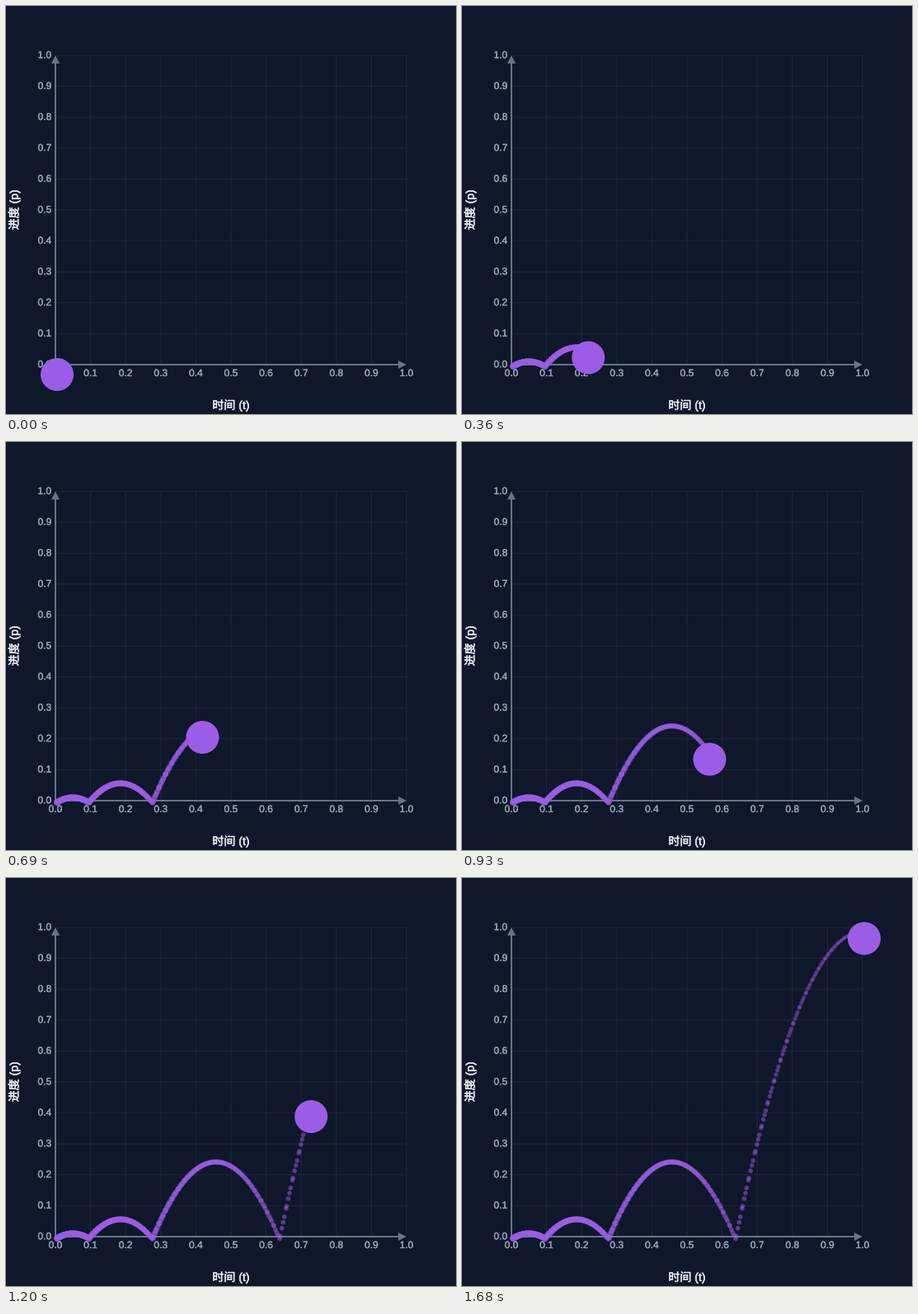
Recreate the animation shown at these times as a matplotlib script. Size 546x496 px, loop 1.71 s.

```python
import matplotlib.pyplot as plt
import numpy as np
from matplotlib.animation import FuncAnimation
from matplotlib.colors import to_rgba
from matplotlib.patches import Circle, Polygon
from matplotlib.patheffects import withStroke

W, H, DPI = 546, 496, 100
PX = 72 / DPI  # points per pixel
LEFT, RIGHT, TOP, BASE = 60, 486, 60, 436
FRAMES, STEP = 57, 30
DELAY, DURATION = 7, 1649

BG, GRID, AXIS = "#0f172a", "#1e293b", "#64748b"
TICK, LABEL, PURPLE = "#94a3b8", "#e2e8f0", "#9b5de5"

plt.rcParams["font.family"] = ["Liberation Sans", "Noto Sans CJK JP"]


def bounce_out(u):
    for shift, floor in ((0, 0), (1.5, 0.75), (2.25, 0.9375), (2.625, 0.984375)):
        arc = 7.5625 * (u - shift / 2.75) ** 2 + floor
        if arc <= 1:
            return arc
    return 1.0


def bounce_in(t):
    return 1 - bounce_out(1 - t)


def center(t, left, bottom, r):
    """Centre of a disc placed by its left and bottom edges."""
    return left + 426 * t + r, bottom - 374.5 * bounce_in(t) - r


fig = plt.figure(figsize=(W / DPI, H / DPI), dpi=DPI, facecolor=BG)
ax = fig.add_axes([0, 0, 1, 1])
ax.set_xlim(0, W)
ax.set_ylim(H, 0)
ax.axis("off")


def line(xs, ys, color, width):
    ax.plot(xs, ys, color=color, lw=width * PX, solid_capstyle="butt",
            snap=False, zorder=1)


def text(x, y, s, size, color, weight, **kw):
    stroke = withStroke(linewidth=weight * PX, foreground=color)
    ax.text(x, y, s, fontsize=size * PX, color=color, zorder=2,
            path_effects=[stroke], **kw)


def tick(x, y, value, ha):
    text(x, y, f"{value:.1f}", 12, TICK, 0.35, ha=ha, va="baseline")


for i in range(11):
    gx = LEFT + (RIGHT - LEFT) * i / 10
    gy = BASE - (BASE - TOP) * i / 10
    line([gx, gx], [TOP, BASE], GRID, 1)
    line([LEFT, RIGHT], [gy, gy], GRID, 1)
    tick(gx, 450, i / 10, "center")
    tick(55.3, gy + 3.3, i / 10, "right")

line([LEFT, LEFT], [TOP + 5, BASE], AXIS, 2)
line([LEFT, RIGHT - 5], [BASE, BASE], AXIS, 2)
for tip in (
    [(LEFT, TOP), (LEFT - 5, TOP + 10), (LEFT + 5, TOP + 10)],
    [(RIGHT, BASE), (RIGHT - 10, BASE - 5), (RIGHT - 10, BASE + 5)],
):
    ax.add_patch(Polygon(tip, color=AXIS, lw=0, zorder=2))

text(273, 490, "时间 (t)", 14, LABEL, 0.5, ha="center", va="baseline")
text(10, 247.7, "进度 (p)", 14, LABEL, 0.5, ha="center", va="center", rotation=90)

# Trail dots come in uneven bursts of five, shrinking and fading with time
bursts = np.arange(56)[:, None] + np.array([0, 0.08, 0.34, 0.54, 0.72])
times = bursts.ravel() * STEP / DURATION
times = times[times <= 1]
radii = 4 - 1.8 * times
points = np.array([center(t, 58, 442, r) for t, r in zip(times, radii)])
colors = [to_rgba(PURPLE, 0.85 - 0.5 * t) for t in times]
trail = ax.scatter(
    points[:, 0], points[:, 1], s=(2 * radii * PX) ** 2, c=colors, linewidths=0, zorder=3
)
ball = ax.add_patch(Circle((0, 0), 20, color=PURPLE, lw=0, zorder=4))


def update(k):
    t = min(max((k * STEP - DELAY) / DURATION, 0), 1)
    trail.set_offsets(points[: np.searchsorted(times, t, side="right")])
    ball.center = center(t, 42, 468, 20)
    return trail, ball


anim = FuncAnimation(
    fig, update, frames=FRAMES, interval=STEP, repeat=True, repeat_delay=0
)
plt.show()
```
